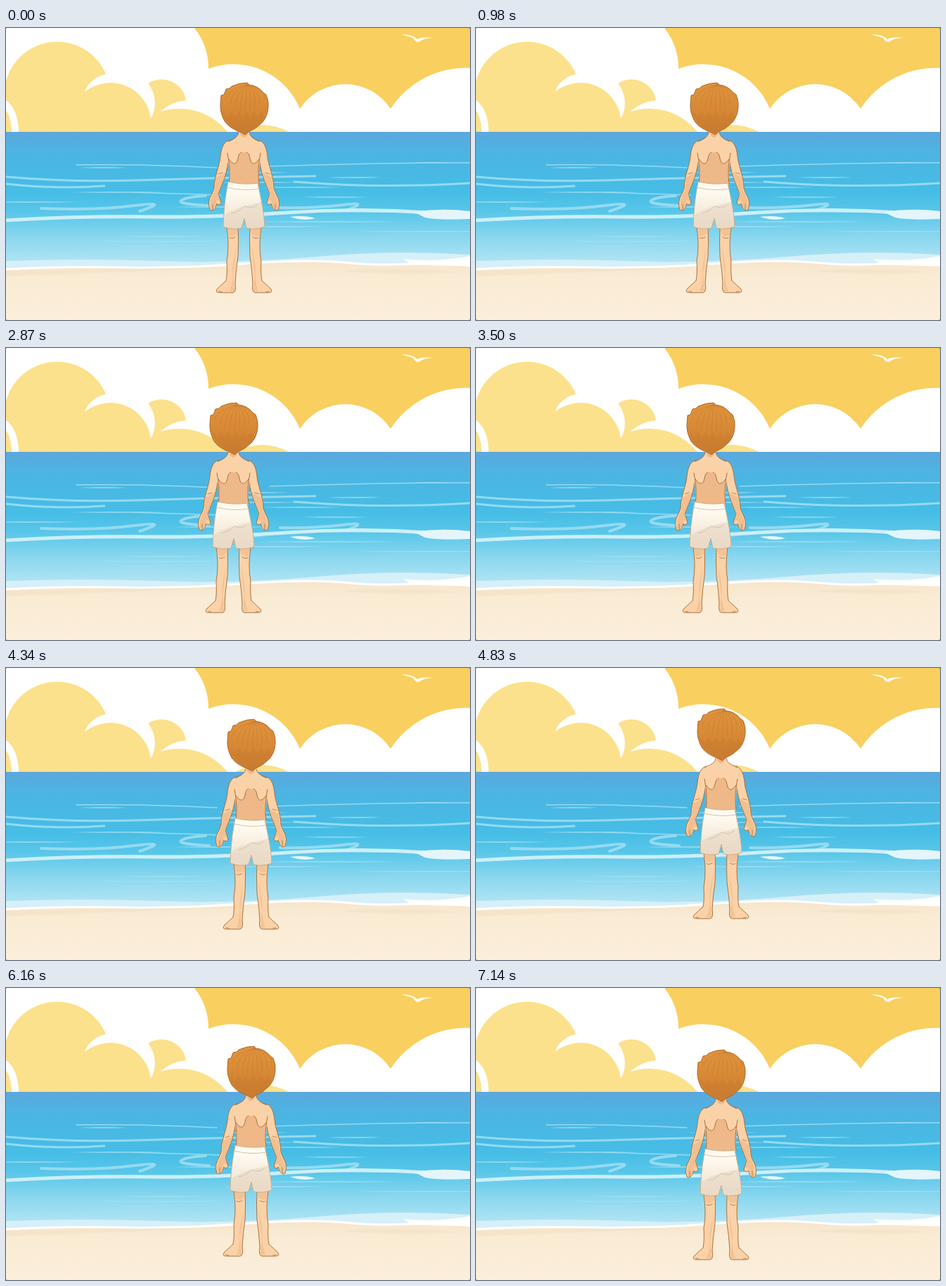
Recreate the animation shown at these times as an HTML page. Size 660x416 px, loop 7210 ms.

```html
<!DOCTYPE html>
<html lang="en">
<head>
<meta charset="utf-8">
<title>Boy on the beach</title>
<style>
html, body { margin: 0; width: 100%; height: 100%; overflow: hidden; background: #75726c; }
svg { display: block; width: 660px; height: 416px; border-radius: 2px; }
.side { animation: side 7210ms infinite; }
.rise { animation: rise 7210ms infinite; }
/* held arrow keys: every step is 5px */
@keyframes side {
  0%, 24.25% { transform: translateX(0); animation-timing-function: steps(3, jump-start); }
  30.08%, 46.58% { transform: translateX(-15px); animation-timing-function: steps(5, jump-start); }
  56.29%, 100% { transform: translateX(10px); }
}
@keyframes rise {
  0%, 60.15% { transform: translateY(0); animation-timing-function: steps(4, jump-start); }
  67.92%, 77.65% { transform: translateY(-20px); animation-timing-function: steps(6, jump-start); }
  89.3%, 100% { transform: translateY(10px); }
}
.skin { fill: #fbd2a8; stroke: #a9713d; stroke-linejoin: round; }
.bare { fill: #fbd2a8; }
.shade { fill: #efb889; }
.line { fill: none; stroke: #a9713d; stroke-linecap: round; }
.wave { fill: none; stroke: #94daf1; stroke-linecap: round; }
</style>
</head>
<body>
<svg viewBox="0 0 660 416">
  <defs>
    <linearGradient id="sea" x1="0" y1="148" x2="0" y2="338" gradientUnits="userSpaceOnUse">
      <stop offset="0" stop-color="#5ca8dd"/>
      <stop offset=".15" stop-color="#4cb4e2"/>
      <stop offset=".45" stop-color="#46bde5"/>
      <stop offset=".6" stop-color="#58c6e9"/>
      <stop offset=".8" stop-color="#8cd8ef"/>
      <stop offset="1" stop-color="#b6e5f4"/>
    </linearGradient>
    <linearGradient id="sand" x1="0" y1="0" x2="0" y2="1">
      <stop offset="0" stop-color="#f6e5cb"/>
      <stop offset=".25" stop-color="#f9ebd4"/>
      <stop offset="1" stop-color="#fcefdb"/>
    </linearGradient>
    <linearGradient id="cloth" x1="0" y1="0" x2="0" y2="1">
      <stop offset=".2" stop-color="#fffaf0"/>
      <stop offset="1" stop-color="#ecddc9"/>
    </linearGradient>
    <linearGradient id="hair" x1="0" y1="0" x2="0" y2="1">
      <stop offset="0" stop-color="#e2943b"/>
      <stop offset="1" stop-color="#cd7d30"/>
    </linearGradient>
    <!-- left half of the body, mirrored for the right -->
    <g id="half">
      <path class="skin" d="M314 284Q318 310 314 332Q315 350 313 360L301 371Q296 377 304 377H323Q328 376 326 364Q327 345 330 325Q331 305 330 284Z"/>
      <path class="shade" opacity=".6" d="M315 285H329L328 293Q321 300 315 293ZM327 310Q326 335 323 350L325 375H318Q324 360 322 342Z"/>
      <path class="line" stroke-width=".8" d="M318 299Q322 301 326 298M303 375L307 376"/>
      <path class="skin" d="M317 160C308 163 306 174 305 183C304 196 296 212 296 228C294 238 285 243 290 259Q296 263 300 250Q303 254 306 249L302 236C310 216 315 206 317 182Z"/>
      <path class="shade" opacity=".75" d="M299 213L312 206L302 236L304 247L300 245L297 258H291Q289 244 297 232Z"/>
      <path class="line" stroke-width=".8" d="M302 208L308 206M294 251V259"/>
      <path class="bare" d="M331 148Q330 158 314 163V184Q319 204 317 224H340V148Z"/>
      <path class="shade" d="M316 184Q326 202 330 186Q331 176 340 177V224H317Q320 204 316 184ZM332 148H340V156Q334 156 332 148Z"/>
      <path class="line" d="M331 149Q330 157 316 161M315 178Q320 203 317 222M317 187Q327 200 330 186Q331 178 335 177"/>
    </g>
  </defs>

  <!-- sky -->
  <path fill="#f9cf5f" d="M0 0H660V148H0Z"/>
  <path fill="#fff" d="M0 0H268A94 94 0 0 1 288 58A102 102 0 0 1 418 115A77 77 0 0 1 547 115A128 128 0 0 1 660 57V148H0Z"/>
  <path fill="#fbe18b" d="M0 76A75 75 0 0 1 142 66A40 40 0 0 0 112 91A58 58 0 0 1 206 129A45 45 0 0 0 202 79A35 35 0 0 1 256 103A60 60 0 0 0 220 119A88 88 0 0 1 315 148H0ZM326 148Q365 128 402 148Z"/>
  <path fill="none" stroke="#fff" stroke-width="10" d="M-4 106Q13 118 13 150"/>
  <path fill="#fffdf5" d="M562 9Q579 9 585 16Q594 12 608 14Q594 14 587 20Q582 20 579 14Z"/>

  <!-- sea -->
  <path fill="url(#sea)" d="M0 148H660V345H0Z"/>
  <g id="glints" fill="#a6e0f3"></g>
  <path class="wave" stroke-width="1.5" d="M100 195Q200 194 300 199M375 197Q520 192 660 192M180 234L305 238"/>
  <path class="wave" stroke-width="3" d="M0 212Q90 220 185 217T440 211M0 222Q70 230 140 225M410 219Q530 229 660 221"/>
  <path class="wave" stroke-width="4" d="M284 239Q254 241 249 246T289 253M50 257Q130 260 183 253T190 261M390 256Q440 257 480 252T482 260"/>
  <path class="wave" stroke-width="5" style="stroke: #cceff9" d="M0 274Q100 268 200 269T400 263T600 263"/>
  <path fill="#e4f6fb" d="M580 262Q620 256 660 261V272Q615 274 596 270ZM404 269Q424 266 440 271Q424 276 404 269Z"/>

  <!-- shore -->
  <path fill="#d5f0f8" d="M0 332Q110 328 220 332T440 326T660 323V345H0Z"/>
  <path fill="#fff" d="M565 329Q610 334 660 325V340H580Z"/>
  <path fill="url(#sand)" stroke="#fff" stroke-width="3" d="M-5 344Q80 339 160 341T335 336T480 334T580 336L665 338V420H-5Z"/>
  <path fill="#f2dfc3" opacity=".5" d="M0 346Q160 342 310 342Q150 348 0 354ZM475 346Q550 340 645 348Q560 354 475 346Z"/>

  <!-- boy -->
  <g class="side"><g class="rise">
    <use href="#half"/>
    <use href="#half" transform="matrix(-1 0 0 1 677 0)"/>
    <path fill="url(#cloth)" stroke="#c9ad89" d="M316 219Q338 224 358 221L360 230Q367 262 368 283Q355 288 342 285L339 271L335 285Q322 288 309 283Q310 252 314 230Z"/>
    <path fill="#e8d8c3" opacity=".6" d="M311 266Q326 257 338 254T363 248L367 282Q354 286 343 284L339 268L334 284Q321 286 310 282Z"/>
    <path class="line" style="stroke: #d8c3a5" d="M314 227Q337 233 360 229M339 254Q332 262 321 264M340 254Q350 259 357 252"/>
    <path fill="url(#hair)" stroke="#a9692c" stroke-linejoin="round" d="M306 96L310 95L313 87L318 86L321 83Q332 78 343 78L346 81Q358 82 366 92L370 95Q374 104 373 113Q372 126 365 134Q357 143 345 148L340 152L335 149Q318 143 311 133Q304 120 305 108Z"/>
    <path id="fringe" fill="#bd742c" opacity=".3"/>
    <path id="strands" class="line" stroke-width=".8" opacity=".45"/>
  </g></g>
</svg>
<script>
const $ = id => document.getElementById(id);
const range = n => [...Array(n).keys()];

let seed = 7;
const rand = () => (seed = seed * 16807 % 2147483647) / 2147483647;

// thin tapered ripples, longer towards the shore
const ripple = (_, i) => {
  const y = 192 + i * 7, half = 25 + rand() * (30 + i * 4), x = rand() * 660;
  return `M${x - half} ${y}Q${x} ${y - 2} ${x + half} ${y}Q${x} ${y + 2} ${x - half} ${y}Z`;
};
$("glints").innerHTML = `<path opacity=".7" d="${range(19).map(ripple).join("")}"/>`;

// hair: strands fan out from the crown, a zigzag shadow lies below
const strand = i => {
  const k = i - 4;
  return `M343 81Q${342 + k * 7} 88 ${340 + k * 7} ${118 - k * k}`;
};
$("strands").setAttribute("d", range(9).map(strand).join(""));
const zigzag = range(12).map(i => `L${310 + i * 5.3} ${i % 2 ? 127 : 119}`).join("");
$("fringe").setAttribute("d", `M308 122${zigzag}Q361 140 340 150Q318 142 308 122Z`);
</script>
</body>
</html>
```
